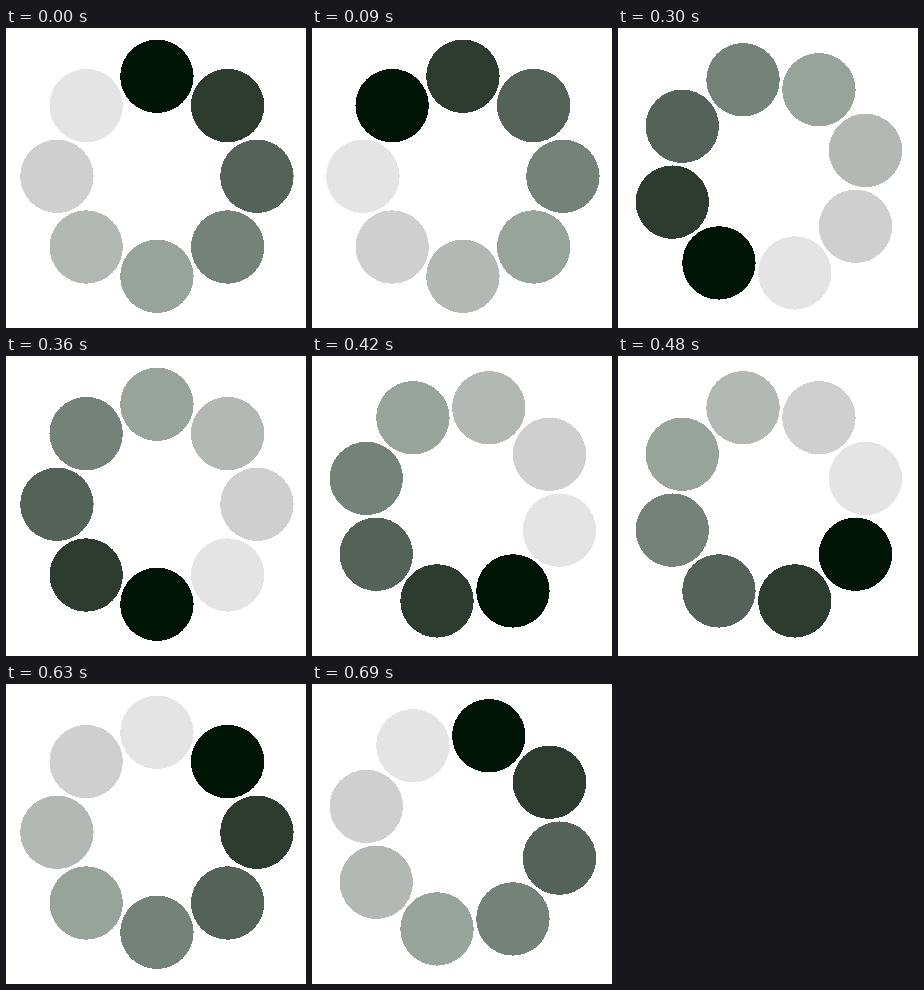
An HTML page for the animation above (760 ms loop, 300x300 px).

```html
<!DOCTYPE html>
<html lang="en">
<head>
<meta charset="utf-8">
<title>Spinner</title>
<style>
  html, body { margin: 0; width: 100%; height: 100%; overflow: hidden; background: #fff; }
  svg { display: block; width: 100vw; height: 100vh; }
</style>
</head>
<body>
<svg id="stage" viewBox="0 0 300 300" shape-rendering="crispEdges"></svg>
<script>
  const LOOP = 760, STEP = 30, STEPS = 24;
  const CENTER = { x: 150.9, y: 148.3 }, ORBIT = 100, RADIUS = 36.7;
  // Clockwise from the leading dot
  const SHADES = ['#001408', '#2d3b31', '#55625a', '#75827a',
                  '#98a39b', '#b4b8b5', '#cecfce', '#e4e4e4'];

  const stage = document.getElementById('stage');
  const dots = SHADES.map(fill => {
    const dot = document.createElementNS('http://www.w3.org/2000/svg', 'circle');
    dot.setAttribute('r', RADIUS);
    dot.setAttribute('fill', fill);
    stage.appendChild(dot);
    return dot;
  });

  // The ring turns anticlockwise in 15 degree ticks; the last tick is held longer.
  function draw(ms) {
    const tick = Math.min(STEPS - 1, Math.floor((ms % LOOP) / STEP));
    const turn = tick / STEPS;
    dots.forEach((dot, i) => {
      const angle = 2 * Math.PI * (i / dots.length - turn);
      dot.setAttribute('cx', (CENTER.x + ORBIT * Math.sin(angle)).toFixed(2));
      dot.setAttribute('cy', (CENTER.y - ORBIT * Math.cos(angle)).toFixed(2));
    });
  }

  const start = performance.now();
  function loop() {
    draw(performance.now() - start);
    requestAnimationFrame(loop);
  }
  loop();
</script>
</body>
</html>
```
